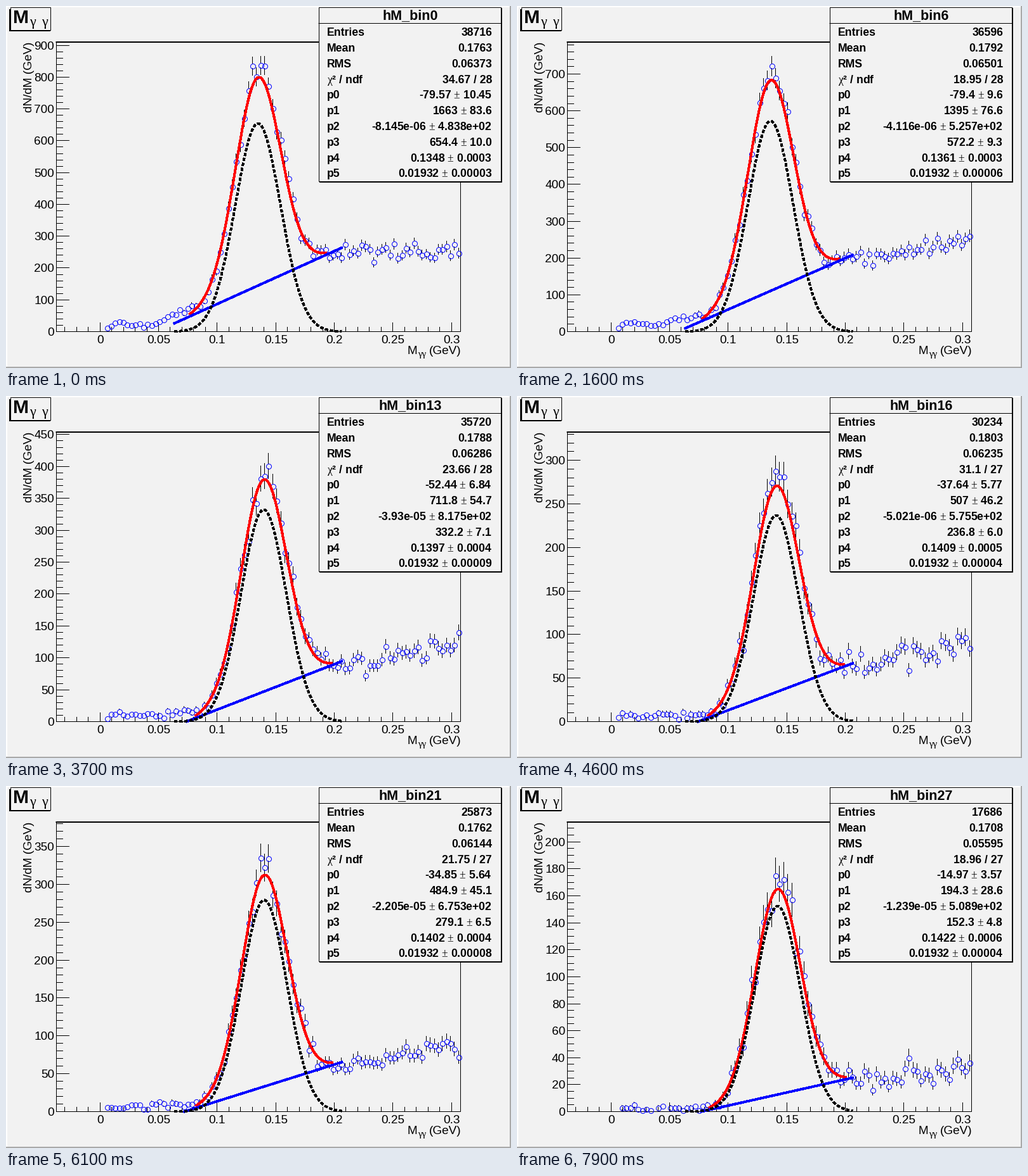
A matplotlib script for the animation above (8 s loop, 796 by 572 pixels).

```python
import numpy as np
import matplotlib.pyplot as plt
from matplotlib.animation import FuncAnimation
from matplotlib.collections import LineCollection
from matplotlib.patches import Rectangle

plt.rcParams.update({
    "font.family": "Liberation Sans",
    "mathtext.fontset": "custom",
    "mathtext.rm": "Liberation Serif",
    "mathtext.it": "Liberation Serif",
    "path.snap": False,
})

W, H, DPI = 796, 572, 64
PT = 72 / DPI                      # points per pixel
BG = "#f2f2f2"
LEFT, RIGHT, TOP, BASE = 79.5, 716.5, 57, 514.5
X0, X_SCALE = 148.2, 1846.5        # pixel of x = 0, pixels per unit
SIGMA = 0.01932

# Key poses of the fit; the bins between are interpolated.
KEYS = [0, 3, 9, 13, 19, 21, 27]
POSES = {
    "entries": [38716, 42567, 30626, 35720, 24749, 25873, 17686],
    "p0": [-79.57, -105, -53.8, -52.44, -22.85, -34.85, -14.97],
    "p1": [1663, 1931, 859.7, 711.8, 302.2, 484.9, 194.3],
    "p3": [654.4, 709.6, 434.9, 332.2, 141.3, 279.1, 152.3],
    "p4": [0.1348, 0.1346, 0.1377, 0.1397, 0.1421, 0.1402, 0.1422],
}


def fit_at(b, rng):
    """Fit values and errors of bin b; the binning is coarser from 20 on."""
    k = 5 if b >= 20 else min(np.searchsorted(KEYS, b, "right") - 1, 3)
    t = (b - KEYS[k]) / (KEYS[k + 1] - KEYS[k])
    f = {name: v[k] * (1 - t) + v[k + 1] * t for name, v in POSES.items()}
    e1 = 2.05 * np.sqrt(f["p1"])
    f.update(
        e0=0.125 * e1, e1=e1,
        p2=-10 ** rng.uniform(-7, -4), e2=rng.uniform(330, 900),
        e3=0.39 * np.sqrt(f["p3"]), e4=0.0075 / np.sqrt(f["p3"]),
        p5=SIGMA, e5=rng.uniform(3e-5, 1e-4),
    )
    return f


def line(x, f):
    return f["p0"] + f["p1"] * x


def gauss(x, f):
    return f["p3"] * np.exp(-0.5 * ((x - f["p4"]) / SIGMA) ** 2)


def total(x, f):
    return line(x, f) + gauss(x, f)


def y_limit(b, f):
    peak = total(f["p4"], f)
    return 1.05 * (peak + (2.4 + 0.025 * b) * np.sqrt(peak))


def spectrum(b, f, rng):
    """Channel centres and counts: the fit, flat tails and counting noise."""
    x = (LEFT - X0 + (RIGHT - LEFT) * (np.arange(12, 100) + 0.5) / 100) / X_SCALE
    rate = total(x, f) * (1 + 0.05 * np.exp(-((x - f["p4"]) / 0.007) ** 2))
    left, right = x < 0.085, x > 0.195
    low, mid = 0.015 * f["p1"], line(0.198, f)
    rate[left] = np.interp(x[left], [0.005, 0.012, 0.045, 0.085],
                           [0.4 * low, low, low, total(0.085, f)])
    rate[right] = np.interp(x[right], [0.195, 0.21, 0.3],
                            [total(0.195, f), mid, mid * min(1 + 0.045 * b, 1.4)])
    noise = 0.9 * np.sqrt(rate) * rng.standard_normal(x.size)
    highest = y_limit(b, f) / 1.05
    n = np.round(np.clip(rate + noise, 0, highest - np.sqrt(highest)))
    return x[n > 0], n[n > 0]


def nice_step(raw):
    power = 10 ** np.floor(np.log10(raw))
    digit = raw / power
    for limit, step in ((1.5, 1), (2.5, 2), (5.001, 5)):
        if digit <= limit:
            return step * power
    return 10 * power


def with_error(value, error):
    s = f"{value:.4g}"
    if "e" in s:
        err = f"{error:.3e}"
    else:
        err = f"{error:.{max(1, len(s.partition('.')[2]))}f}"
    return rf"{s} $\pm$ {err}"


def px(x):
    return X0 + X_SCALE * x


def crisp(v):
    """Move to the centre of a pixel."""
    return np.floor(v) + 0.5


fig = plt.figure(figsize=(W / DPI, H / DPI), dpi=DPI, facecolor=BG)
ax = fig.add_axes([0, 0, 1, 1])
ax.set(xlim=(0, W), ylim=(H, 0))
ax.axis("off")


def text(x, y, s, size, **kw):
    return ax.text(x, y, s, fontsize=size * PT, zorder=kw.pop("zorder", 4), **kw)


def box(x, y, w, h, color, edge="none", z=0):
    ax.add_patch(Rectangle((x, y), w, h, fc=color, ec=edge, lw=PT, zorder=z))


def curve(x, y, to_y, color, **kw):
    shown = y >= 0
    return ax.plot(px(x[shown]), to_y(y[shown]), color=color, lw=3 * PT,
                   zorder=3, dash_capstyle="butt", antialiased=False, **kw)[0]


def strokes(segments):
    return ax.add_collection(LineCollection(
        segments, colors="black", linewidths=PT, zorder=2, antialiased=False))


def draw_static():
    box(0, 0, W, 2, "white")
    box(0, 0, 2, H, "white")
    box(0, H - 2, W, 2, "#a9a9a9")
    box(W - 2, 0, 2, H, "#a9a9a9")

    ax.plot([LEFT, LEFT, RIGHT, RIGHT], [TOP, BASE, BASE, TOP], "k", lw=PT)
    ax.plot([LEFT, RIGHT], [TOP, TOP], "k", lw=2 * PT)
    ticks = []
    for k in range(-3, 31):
        x = crisp(px(k / 100))
        ticks.append([(x, BASE), (x, BASE - (7 if k % 5 else 14))])
        if k >= 0 and k % 5 == 0:
            text(x, 533, f"{k / 100:g}", 19, ha="center")
    strokes(ticks)
    text(633, 550, "M", 19)
    text(649.5, 554, "γγ", 15, family="Liberation Serif")
    text(717, 550, "(GeV)", 19, ha="right")
    text(41, 57, "dN/dM (GeV)", 19, rotation=90, ha="right", va="baseline",
         rotation_mode="anchor")

    box(5, 5, 65, 35, "black")
    box(7.5, 2.5, 63, 36, BG, "black", 1)
    text(11, 27, "M", 30, weight="bold")
    for x in (37, 56):
        text(x, 31, "γ", 22, family="Liberation Serif")

    box(494, 3, 288, 276, "black", z=5)
    box(493.5, 2.5, 287, 275, BG, "black", 6)
    ax.plot([493, 781], [27.5, 27.5], "k", lw=PT, zorder=7)
    names = ["Entries", "Mean", "RMS", r"$\chi$² / ndf"]
    for row, name in enumerate(names + [f"p{i}" for i in range(6)]):
        text(506, 47.3 + 24.8 * row, name, 17.6, weight="bold", zorder=7)


def draw_stats(b, f, x, n):
    mean = np.average(x, weights=n)
    rms = np.sqrt(np.average((x - mean) ** 2, weights=n))
    core = abs(x - f["p4"]) < 3 * SIGMA
    chi2 = np.sum((n - total(x, f))[core] ** 2 / n[core])
    values = [f"{f['entries']:.0f}", f"{mean:.4g}", f"{rms:.4g}",
              f"{chi2:.4g} / {core.sum() - 6}"]
    values += [with_error(f[f"p{i}"], f[f"e{i}"]) for i in range(6)]
    out = [text(637, 21, f"hM_bin{b}", 21.5, weight="bold", ha="center", zorder=7)]
    for row, value in enumerate(values):
        out.append(text(766, 47.3 + 24.8 * row, value, 17.6, weight="bold",
                        ha="right", zorder=7))
    return out


def draw_y_axis(top, to_y):
    step = nice_step(top / 10)
    minor = nice_step(step / 5)
    per_step = round(step / minor)
    out, ticks = [], []
    for k in range(int(top / minor) + 1):
        y = crisp(to_y(k * minor))
        ticks.append([(LEFT, y), (LEFT + (10 if k % per_step else 20), y)])
        if k % per_step == 0:
            out.append(text(76, y + 6.5, f"{k * minor:g}", 19, ha="right"))
    return out + [strokes(ticks)]


def draw_points(x, n, to_y):
    cx, cy, err = crisp(px(x)), crisp(to_y(n)), np.sqrt(n)
    segments = []
    for u, v, hi, lo in zip(cx, cy, to_y(n + err), to_y(n - err)):
        if v - hi > 4:
            segments += [[(u, hi), (u, v - 4)], [(u, v + 4), (u, lo)]]
    dots, = ax.plot(cx, cy, "o", ms=8 * PT, mfc="none", mec="blue", mew=PT,
                    zorder=2.5)
    return [strokes(segments), dots]


dynamic = []


def update(frame):
    while dynamic:
        dynamic.pop().remove()
    b = (frame + 2) // 3
    rng = np.random.default_rng(b)
    f = fit_at(b, rng)
    x, n = spectrum(b, f, rng)
    top = y_limit(b, f)

    def to_y(v):
        return BASE - (BASE - TOP) * v / top

    wide = np.linspace(0.0635, 0.2062, 200)
    core = f["p4"] + SIGMA * np.linspace(-3, 3, 150)
    dynamic.extend(draw_stats(b, f, x, n) + draw_y_axis(top, to_y)
                   + draw_points(x, n, to_y))
    dynamic.extend([
        curve(core, total(core, f), to_y, "red"),
        curve(wide, line(wide, f), to_y, "blue"),
        curve(wide, gauss(wide, f), to_y, "black", ls=(0, (1.4, 1))),
    ])
    return dynamic


draw_static()
anim = FuncAnimation(fig, update, frames=80, interval=100, repeat=True,
                     repeat_delay=0, init_func=lambda: update(0))
plt.show()
```
